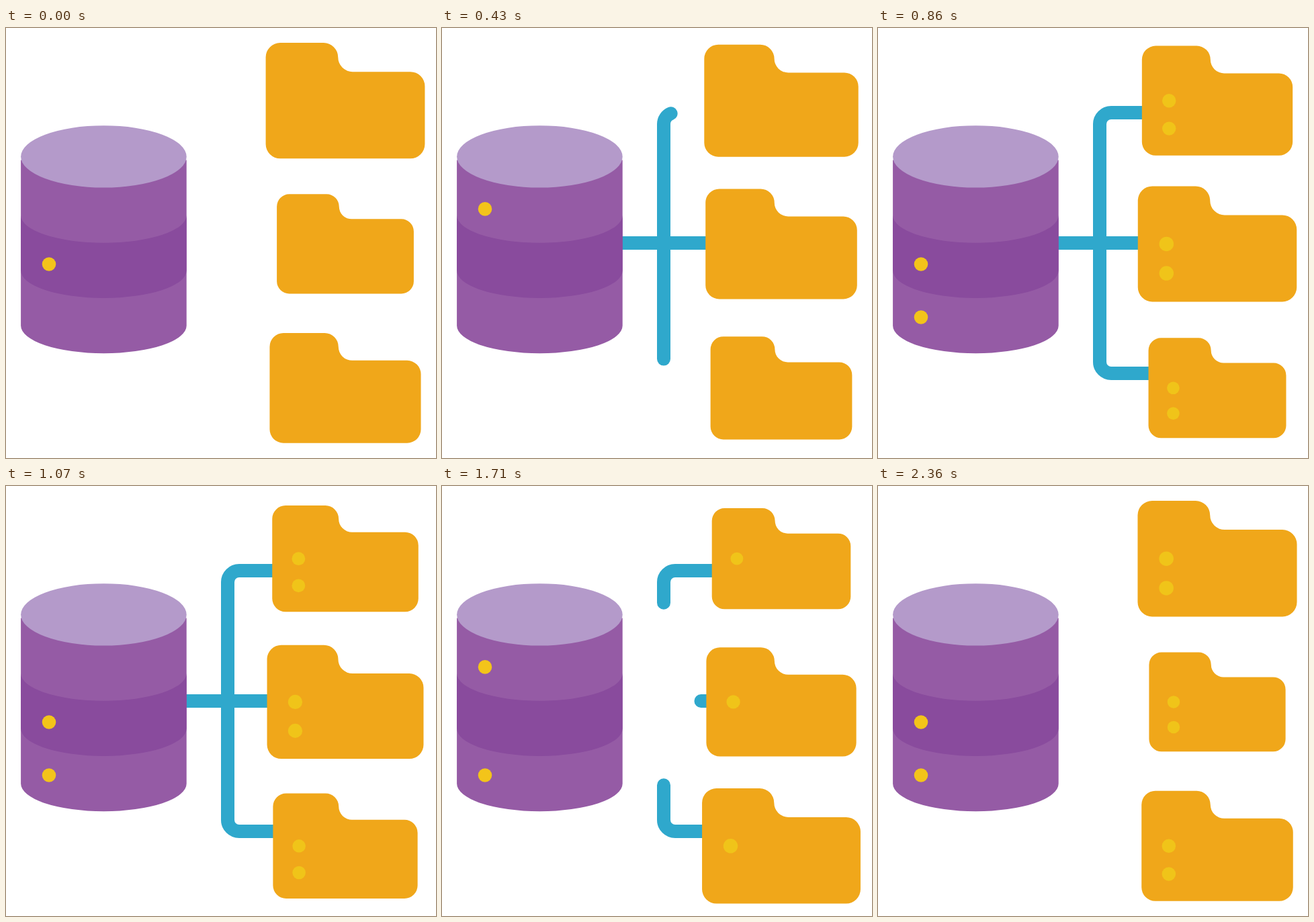
An HTML page that plays this animation: 640 px wide and 640 px high, repeating every 2.43 s.

```html
<!DOCTYPE html>
<html>
<head>
<meta charset="utf-8">
<style>
  html, body { margin: 0; height: 100%; overflow: hidden; background: #fff; }
  svg { display: block; width: 100vw; height: 100vh; }
  .line { fill: none; stroke: #2fa8cc; stroke-width: 20; stroke-linecap: round; }
  .dot { fill: #f3c41a; }
  .folder .dot { fill: #f0c419; }
</style>
</head>
<body>
<svg viewBox="0 0 640 640">
  <defs>
    <!-- corner radius is one unit -->
    <path id="shape" fill="#f0a71a" d="M-5.5-3a1 1 0 0 1 1-1h3a1 1 0 0 1 1 1a1 1 0 0 0 1 1h4a1 1 0 0 1 1 1v4a1 1 0 0 1-1 1h-9a1 1 0 0 1-1-1z"/>
  </defs>

  <path class="line" pathLength="1" d="M160 320H330V143A17 17 0 0 1 347 126H529"/>
  <path class="line" pathLength="1" d="M160 320H556"/>
  <path class="line" pathLength="1" d="M160 320H330V497A17 17 0 0 0 347 514H492"/>

  <path fill="#955ba5" d="M22.1 196.4V443.1A123.3 41.1 0 0 0 268.7 443.1V196.4z"/>
  <path fill="#894b9d" d="M22.1 278.7A123.3 41.1 0 0 0 268.7 278.7V360.9A123.3 41.1 0 0 1 22.1 360.9z"/>
  <ellipse cx="145.4" cy="191.4" rx="123.3" ry="46.2" fill="#b49aca"/>
  <circle class="dot top" cx="64" cy="269.4" r="10.3"/>
  <circle class="dot mid" cx="64" cy="351.5" r="10.3"/>
  <circle class="dot low" cx="64" cy="430.5" r="10.3"/>

  <g class="folder"></g>
  <g class="folder"></g>
  <g class="folder"></g>
</svg>
<script>
const LOOP = 2430, FRAMES = 34, FPS = 14;
const SIZES = [21.55, 20.5, 18.47];
const CENTERS = [108.2, 321.4, 535.8];
const all = q => [...document.querySelectorAll(q)];

const folders = all('.folder');
for (const f of folders) {
  f.innerHTML = '<use href="#shape"/>' +
    '<circle class="dot low" cx="-3.52" r=".5"/><circle class="dot end" cx="-3.52" cy="2.03" r=".5"/>';
}
const lines = all('.line');
const dots = {};
for (const name of ['top', 'mid', 'low', 'end']) dots[name] = all('.' + name);

function ease(x) {
  x = Math.min(1, Math.max(0, x));
  return x * x * (3 - 2 * x);
}

// Cycle through the three sizes, easing between neighbours
function size(p) {
  const u = p % 1 * 3, i = Math.floor(u);
  const a = SIZES[i], b = SIZES[(i + 1) % 3];
  return a + (b - a) * ease(u - i);
}

const within = (k, ...spans) => spans.some(([a, b]) => k >= a && k < b);

function show(name, on) {
  for (const d of dots[name]) d.style.visibility = on ? 'visible' : 'hidden';
}

function draw(t) {
  const k = Math.min(FRAMES - 1, Math.floor((t % LOOP + 5) * FPS / 1000));
  const p = (k + 0.9) / FRAMES;

  folders.forEach((f, i) => {
    const s = size(p + (3 - i) / 3);
    f.setAttribute('transform', `translate(505 ${CENTERS[i]}) scale(${s})`);
  });

  const end = ease(p * 3), start = ease((p - 0.41) / 0.59);
  for (const l of lines) {
    l.style.strokeDasharray = `${Math.max(0, end - start)} 2`;
    l.style.strokeDashoffset = -start;
  }

  const top = within(k, [5, 12], [20, 28]);
  show('top', top);
  show('mid', !top);
  show('low', within(k, [2, 6], [12, 27], [31, 34]));
  show('end', within(k, [2, 6], [12, 20], [28, 34]));
}

function tick() {
  draw(performance.now());
  requestAnimationFrame(tick);
}
tick();
</script>
</body>
</html>
```
